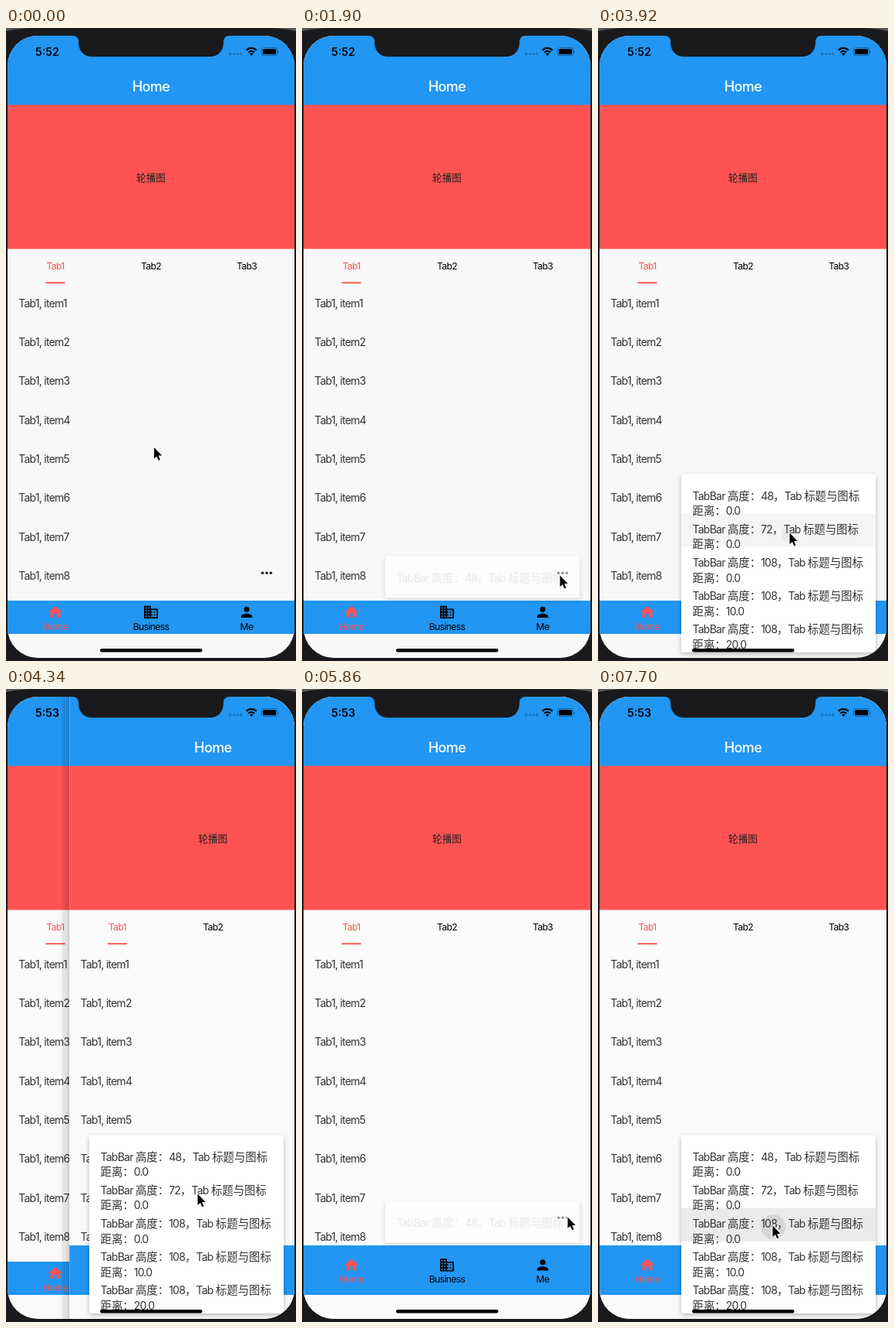
Write an HTML page that moves like this. It is 376 px wide and 818 px high and loops after 8 s.

```html
<!DOCTYPE html>
<html lang="zh">
<head>
<meta charset="utf-8">
<title>Tab bar demo</title>
<style>
  html, body { margin: 0; width: 100%; height: 100%; overflow: hidden; background: #1a1a1c; }
  svg { display: block; width: 100%; height: 100%; }
  text { font-family: Inter, 'Noto Sans CJK SC', 'Noto Sans CJK', sans-serif; white-space: pre; }
  .mid { text-anchor: middle; }
  .title { font-size: 18px; font-weight: 500; letter-spacing: -.6px; fill: #fff; }
  .tab { font-size: 12.2px; letter-spacing: -.65px; }
  .row { font-size: 14px; letter-spacing: -.75px; fill: #333; }
  .cjk { font-family: 'Noto Sans CJK SC', 'Noto Sans CJK', sans-serif; font-size: 14.4px; letter-spacing: 0; }
  .banner { font-size: 12.6px; fill: #222; }
  .clock { font-size: 14.2px; font-weight: 600; }
</style>
</head>
<body>
<svg id="stage" viewBox="0 0 376 818" preserveAspectRatio="none">
  <defs>
    <clipPath id="screen"><rect x="2" y="10" width="372" height="804" rx="39"/></clipPath>
    <clipPath id="menuClip"><rect id="menuMask" x="108" width="252" rx="2"/></clipPath>
    <linearGradient id="edge">
      <stop offset="0" stop-opacity=".07"/>
      <stop offset=".6" stop-opacity=".1"/>
      <stop offset="1" stop-opacity=".2"/>
    </linearGradient>
    <filter id="lift" x="-10%" y="-20%" width="120%" height="150%">
      <feDropShadow dx="0" dy="2.5" stdDeviation="3" flood-opacity=".26"/>
    </filter>
  </defs>
  <rect width="376" height="818" fill="#1a1a1c"/>
  <path d="M0 0H32Q12 1 0 4ZM376 0H344Q364 1 376 4Z" fill="#55565a"/>
  <g clip-path="url(#screen)">
    <g id="oldPage"></g>
    <g id="newPage"></g>
    <g id="menu">
      <rect id="menuCard" x="108" width="252" rx="2" fill="#fff" filter="url(#lift)"/>
      <g clip-path="url(#menuClip)">
        <g id="menuBody">
          <g id="press">
            <rect x="108" width="252" height="43.1" fill-opacity=".08" id="pressRow"/>
            <circle id="ripple" r="16" fill-opacity=".09"/>
          </g>
          <g id="entries"></g>
        </g>
      </g>
    </g>
    <rect x="122" y="802" width="132.5" height="4.5" rx="2.25"/>
    <text id="clock" class="clock" x="38" y="35.5"></text>
    <g fill="#000" fill-opacity=".3" id="signal"></g>
    <path d="M311.7 28.6a9.3 9.3 0 0 1 13 0M314.2 31.5a5.8 5.8 0 0 1 8 0"
          fill="none" stroke="#000" stroke-width="2.2"/>
    <path d="M315.9 33.3a3.3 3.3 0 0 1 4.6 0L318.2 35.9z"/>
    <rect x="331.5" y="25.5" width="20" height="10" rx="2.8" fill="none" stroke="#000" stroke-opacity=".4"/>
    <rect x="333" y="27" width="17" height="7" rx="1.5"/>
    <path d="M352.7 28.7q2 1.8 0 3.6z" fill-opacity=".5"/>
  </g>
  <path d="M86 9H290V10Q282 10 282 18C282 30 275 37 264 37H112C101 37 94 30 94 18Q94 10 86 10Z" fill="#1a1a1c"/>
  <path id="cursor" d="M0 0V14.5L3.4 11.4L5.7 16.8L7.9 15.9L5.7 10.6H10.2Z"
        stroke="#fff" stroke-width="2" paint-order="stroke"/>
</svg>
<script>
const LOOP = 8000, RED = '#ff5252', BLUE = '#2196f3';
const SCALE = 372 / 414;
const $ = id => document.getElementById(id);
const clamp = v => Math.max(0, Math.min(1, v));
const interval = (t, a, b) => clamp((t - a) / (b - a));
const set = (id, attrs) => {
  for (const key in attrs) $(id).setAttribute(key, attrs[key]);
};

const label = (cls, x, y, str, fill) =>
  `<text class="${cls}" x="${x}" y="${y}"${fill ? ` fill="${fill}"` : ''}>${str}</text>`;
const mixed = str => str.replace(/[\u4e00-\u9fff\uff00-\uffef]+/g, '<tspan class="cjk">$&</tspan>');
const band = (top, bottom, fill) =>
  `<rect x="2" y="${top}" width="372" height="${bottom - top}" fill="${fill}"/>`;

const ICONS = {
  Home: 'M10 20v-6h4v6h5v-8h3L12 3 2 12h3v8z',
  Business: 'M12 7V3H2v18h20V7zM6 19H4v-2h2zm0-4H4v-2h2zm0-4H4V9h2zm0-4H4V5h2z' +
    'm4 12H8v-2h2zm0-4H8v-2h2zm0-4H8V9h2zm0-4H8V5h2z' +
    'm10 12h-8v-2h2v-2h-2v-2h2v-2h-2V9h8zM18 11h-2v2h2zm0 4h-2v2h2z',
  Me: 'M12 12a4 4 0 1 0 0-8a4 4 0 0 0 0 8zm0 2c-2.67 0-8 1.34-8 4v2h16v-2c0-2.66-5.33-4-8-4z'
};
const columns = [64, 188, 312];
const BAR_TOPS = [740, 719], BAR_BOTTOM = 783;

function page(barTop) {
  const mid = (barTop + BAR_BOTTOM) / 2;
  const rows = Array.from({ length: 8 }, (_, i) =>
    label('row', 16.2, 360.6 + i * 56 * SCALE, `Tab1, item${i + 1}`));
  const tabs = columns.map((x, i) =>
    label('tab mid', x, 312, `Tab${i + 1}`, i ? '#000' : RED));
  const dots = [-1, 0, 1].map(i =>
    `<circle cx="${338 + i * 5.4}" cy="${barTop - 35.7}" r="1.8" fill="#222"/>`);
  const nav = Object.keys(ICONS).map((name, i) => {
    const fill = i ? '#000' : RED;
    return `<path d="${ICONS[name]}" fill="${fill}" fill-rule="evenodd"
      transform="translate(${columns[i] - 12 * SCALE} ${mid - 17.4}) scale(${SCALE})"/>` +
      label('tab mid', columns[i], mid + 16.3, name, fill);
  });
  return `<rect class="paper" x="2" y="10" width="372" height="804"/>` +
    band(99, 285.5, RED) + label('cjk banner mid', 188, 197.5, '轮播图') +
    band(10, 99.4, BLUE) + label('title mid', 188, 81.8, 'Home') +
    tabs.join('') + `<rect x="51.5" y="328.3" width="25" height="1.9" fill="${RED}"/>` +
    rows.join('') + dots.join('') + band(barTop, BAR_BOTTOM, BLUE) + nav.join('');
}

const MENU_H = 230, MENU_BOTTOM = 806.5, ROW_H = 48 * SCALE;
const options = [[48, '0.0'], [72, '0.0'], [108, '0.0'], [108, '10.0'], [108, '20.0']];

$('oldPage').innerHTML = page(BAR_TOPS[0]);
$('newPage').innerHTML =
  `<rect x="-8" y="10" width="10" height="804" fill="url(#edge)"/>` + page(BAR_TOPS[1]);
$('entries').innerHTML = options.map(([height, gap], i) => {
  const y = 33 + i * ROW_H;
  return label('row', 122.5, y, mixed(`TabBar 高度：${height}，Tab 标题与图标`)) +
    label('row', 122.5, y + 19.8, mixed(`距离：${gap}`));
}).join('');
$('signal').innerHTML = [0, 1, 2, 3].map(i =>
  `<circle cx="${290.8 + i * 4.6}" cy="33.5" r="1.4"/>`).join('');
const papers = document.querySelectorAll('.paper');
const lines = [...$('entries').children];

// [first step, last step, number of steps, x, y]
const moves = [
  [150, 1110, 8, 321, 712], [1230, 1350, 2, 334.5, 707.5],
  [2700, 2970, 3, 274.5, 606.5], [3100, 3510, 4, 248.5, 652.5],
  [4610, 5040, 4, 322.5, 671.5], [5170, 5310, 2, 336, 693],
  [5440, 5580, 2, 344.5, 682.5], [6540, 6840, 3, 226.5, 693.5]
];

function cursorAt(time) {
  let x = 192, y = 542;
  for (const [start, end, steps, toX, toY] of moves) {
    if (time < start) break;
    const step = Math.floor((time - start) / (end - start) * (steps - 1) + 1e-6) + 1;
    const k = Math.min(1, step / steps);
    const eased = k * k * (3 - 2 * k);
    x += (toX - x) * eased;
    y += (toY - y) * eased;
  }
  return [x, y];
}

// Value of the last [time, value] pair already reached
const held = (time, pairs) => pairs.reduce((v, [at, next]) => time >= at ? next : v, 0);
const menuSteps = [[1900, .18], [2180, .91], [2300, 1], [4490, .4], [4610, 0],
  [5860, .18], [6010, .91], [6130, 1]];
const pressSteps = [[3920, .5], [4070, 1], [4340, 0], [7550, .5], [7700, 1]];
const slideSteps = [[0, 400], [4340, 80.3], [4490, 1], [4610, 0]];
const paperSteps = [[0, '#f8f8f8'], [4070, '#fafafa'], [5040, '#f8f8f8'], [5860, '#fafafa']];

function drawMenu(time) {
  const open = held(time, menuSteps);
  const unit = 1 / (options.length + 1.5);
  const h = MENU_H * interval(open, 0, unit * options.length);
  const secondPage = time > 5000 ? 1 : 0;
  const top = Math.min(BAR_TOPS[secondPage] - 57.3, MENU_BOTTOM - h);
  set('menu', { opacity: interval(open, 0, 1 / 3), display: open ? 'inline' : 'none' });
  set('menuCard', { y: top, height: h });
  set('menuMask', { y: top, height: h });
  set('menuBody', { transform: `translate(0 ${top})` });
  lines.forEach((line, i) => {
    const start = (i / 2 + 1) * unit;
    line.setAttribute('opacity', interval(open, start, start + unit));
  });

  const [x, y] = cursorAt(time);
  const press = held(time, pressSteps);
  set('press', { opacity: press });
  set('pressRow', { y: 8 + (1 + secondPage) * ROW_H });
  set('ripple', { cx: x + .5, cy: y + 1.5 - top, r: 8 + 8 * press });
}

function draw(time) {
  set('newPage', { transform: `translate(${held(time, slideSteps)} 0)` });
  papers.forEach(p => p.setAttribute('fill', held(time, paperSteps)));
  $('clock').textContent = time < 4070 ? '5:52' : '5:53';
  drawMenu(time);
  set('cursor', { transform: `translate(${cursorAt(time)})` });
}

const begin = performance.now();
function tick() {
  draw((performance.now() - begin) % LOOP);
  requestAnimationFrame(tick);
}
tick();
</script>
</body>
</html>
```
